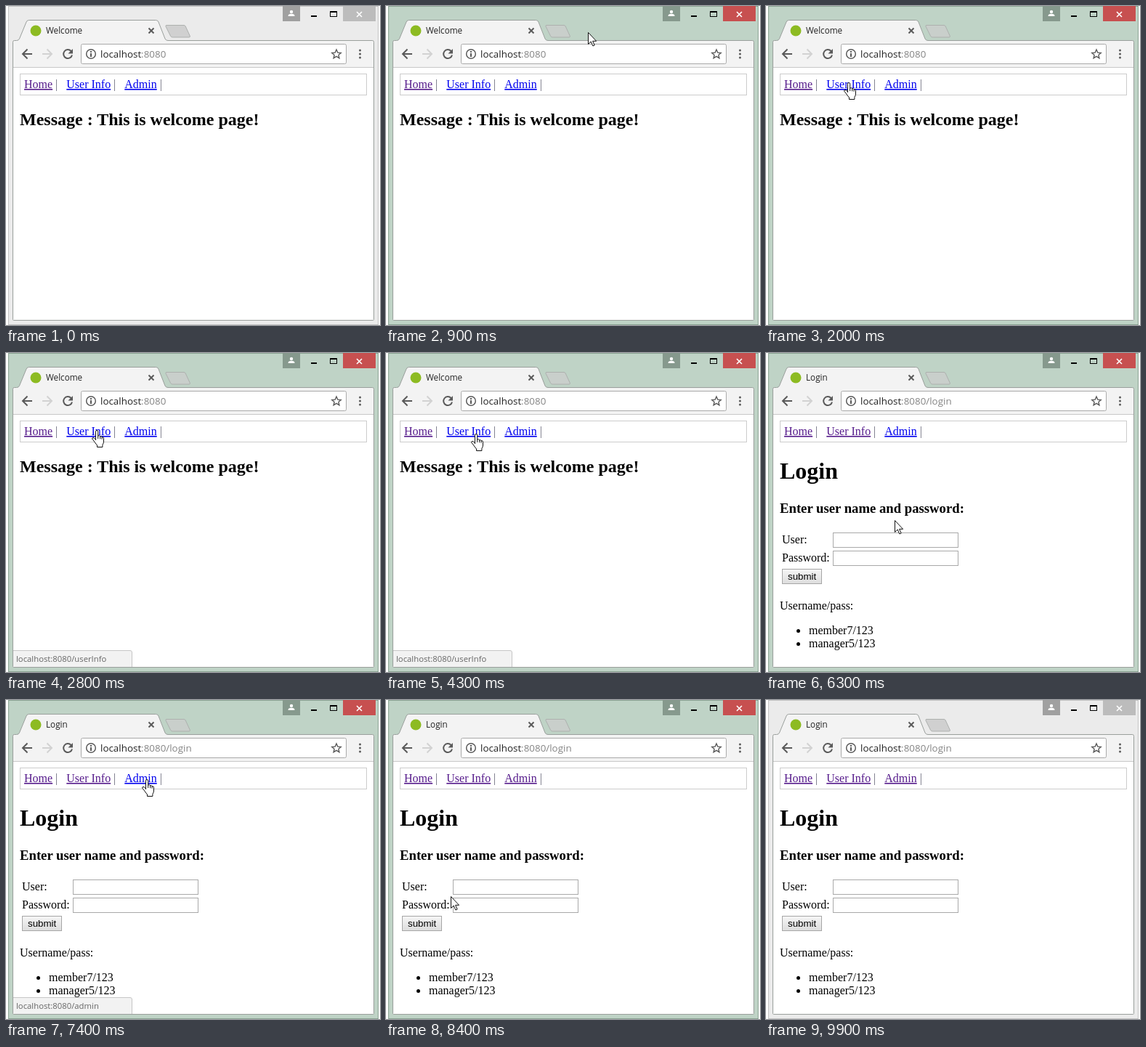
An HTML page that plays this animation: 515 by 439 pixels, repeating every 10 s.

```html
<!DOCTYPE html>
<html lang="en">
<head>
<meta charset="utf-8">
<title>Login demo</title>
<style>
html, body { margin: 0; width: 100%; height: 100%; overflow: hidden; background: #fff; }
svg { display: block; --frame: #ebebeb; --edge: #c3c3c3; --user: #a0a0a0; --close: #bcbcbc; --plus: #d0d0d0; }
svg.on { --frame: #bfd3c6; --edge: #8ba394; --user: #86998d; --close: #c75050; --plus: #c9cfcb; }
text { font: 16px "Liberation Serif", "Times New Roman", serif; white-space: pre; }
.ui { font-family: "Open Sans", "Noto Sans", sans-serif; }
.link { fill: #00e; text-decoration: underline; text-decoration-skip-ink: none; }
.seen { fill: #551a8b; }
.bar { fill: #667; }
.bold { font-weight: bold; }
.icon { fill: none; stroke: #5a5a5a; stroke-width: 2; }
.field { fill: #fff; stroke: #a9a9a9; }
.cursor { fill: #fff; stroke: #111; stroke-linejoin: round; }
</style>
</head>
<body>
<svg id="stage" width="515" height="439" viewBox="0 0 515 439">
  <defs>
    <linearGradient id="face" x2="0" y2="1"><stop stop-color="#f6f6f6"/><stop offset="1" stop-color="#ddd"/></linearGradient>
  </defs>

  <!-- window frame -->
  <rect x="3.5" y=".5" width="509" height="438" fill="var(--frame)" stroke="var(--edge)"/>
  <path d="M381 0h24v21h-24z" fill="var(--user)"/>
  <g fill="#fff"><circle cx="393" cy="8" r="2.2"/><path d="M388.5 14q0-3.2 4.5-3.2t4.5 3.2z"/></g>
  <path d="M420 13h8v2h-8z"/>
  <path d="M446 7h10v8h-10zm1 2v5h8v-5z" fill-rule="evenodd"/>
  <path d="M464 0h45v21h-45z" fill="var(--close)"/>
  <path d="M483 8l7 7m0-7l-7 7" stroke="#fff" stroke-width="1.6"/>

  <!-- tab strip and toolbar -->
  <path d="M221 26.5h24q1.500 0 2.200 1.500l6 13q.8 2-1 2h-23q-1.800 0-2.500-1.500l-6.500-13q-.9-2 .8-2z" fill="var(--plus)" stroke="#adb0ae"/>
  <path d="M9.500 431.500v-382q0-2 2-2h3q3 0 4-2.500l9.500-23q1-2.500 3.500-2.500h175q2.500 0 3.500 2.500l9 23q1 2.500 4 2.500h281.500q2 0 2 2v382q0 1-1 1h-495q-1 0-1-1z" fill="#f3f3f3" stroke="#9a9f9c"/>
  <path d="M10 85h496v347H10z" fill="#fff"/>
  <path d="M10 84.500h496" stroke="#c8c8c8"/>
  <circle cx="41" cy="34" r="7.500" fill="#8dbb22"/>
  <text class="ui" id="title" x="55" y="38" style="font-size:11.700px" fill="#222"></text>
  <path class="icon" d="M196.500 30.500l7 7m0-7l-7 7"/>
  <path class="icon" d="M36 66H23m6.500-6.500L23 66l6.500 6.500"/>
  <path class="icon" d="M50 66h13m-6.500-6.500L63 66l-6.500 6.500" style="stroke:#d2d2d2"/>
  <path class="icon" d="M89.600 62A6 6 0 1 0 91 67.500"/>
  <path d="M92 59v6.500h-6.500z" fill="#5a5a5a"/>
  <rect class="field" x="103.500" y="52.500" width="365" height="27" rx="2"/>
  <circle class="icon" cx="117" cy="66" r="6.300" style="stroke-width:1.500"/>
  <path d="M116 62h2v2h-2zm0 3h2v5h-2z" fill="#5a5a5a"/>
  <text class="ui" x="130" y="71" style="font-size:13.400px" fill="#222">localhost<tspan id="path" fill="#858585"></tspan></text>
  <path class="icon" d="M455 60l1.800 4.100 4.400.4-3.300 2.900 1 4.300-3.900-2.300-3.900 2.300 1-4.300-3.300-2.900 4.400-.4z" style="stroke-width:1.400"/>
  <path d="M487.500 61v11" fill="none" stroke="#5a5a5a" stroke-width="3" stroke-linecap="round" stroke-dasharray="0 5"/>

  <!-- page -->
  <rect x="19.500" y="93.500" width="477" height="29" fill="none" stroke="#ccc"/>
  <text class="link seen" x="25" y="113">Home</text><text class="bar" x="68" y="113">|</text>
  <text class="link" id="info" x="83.300" y="113">User Info</text><text class="bar" x="148" y="113">|</text>
  <text class="link" id="admin" x="163.300" y="113">Admin</text><text class="bar" x="211.800" y="113">|</text>

  <text class="bold" id="welcome" x="19" y="164" style="font-size:24px">Message : This is welcome page!</text>
  <g id="login">
    <text class="bold" x="19" y="173" style="font-size:32px">Login</text>
    <text class="bold" x="19" y="220" style="font-size:18.720px">Enter user name and password:</text>
    <text x="22" y="262">User:</text>
    <rect class="field" x="92.500" y="247.500" width="172" height="20"/>
    <text x="22" y="287">Password:</text>
    <rect class="field" x="92.500" y="272.500" width="172" height="20"/>
    <rect x="22.500" y="297.500" width="54" height="20" fill="url(#face)" stroke="#a6a6a6"/>
    <text x="30" y="312" style="font:13.333px 'Liberation Sans',Arial,sans-serif">submit</text>
    <text x="19" y="353">Username/pass:</text>
    <circle cx="44.500" cy="382.500" r="2.500"/><text x="59" y="387">member7/123</text>
    <circle cx="44.500" cy="400.500" r="2.500"/><text x="59" y="405">manager5/123</text>
  </g>

  <g id="status">
    <path d="M10 409.500h161q2.500 0 2.500 2.500v20H10z" fill="#f2f2f2"/>
    <path d="M10 409.500h161q2.500 0 2.500 2.500v20" fill="none" stroke="#c6c6c6"/>
    <text class="ui" id="address" x="14" y="425" style="font-size:11.300px" fill="#666"></text>
  </g>

  <g id="cursor" class="cursor">
    <path id="arrow" d="M.5.5v16l3.700-3.500 2.700 6 2.300-1-2.600-5.700h5z"/>
    <path id="beam" d="M-3-7.500h2.500l.5.500.5-.5H3M0-7V7M-3 7.500h2.500L0 7l.5.500H3" fill="none"/>
    <g id="hand" transform="translate(-5)">
      <path d="M5.500 14V2.200Q5.500.5 7.100.5t1.600 1.700V8q2.400-1 3 .8 2-.6 2.400.9 2.400-.3 2.400 1.600V16q0 2-1.600 4.500v3H7.500V21Q5 18 3 15L.8 12.400Q.2 10.600 2 10.500q2 .2 3.500 2.500"/>
      <path d="M8.700 8v4m3-3.200v3.500m2.400-2.600v3" fill="none"/>
    </g>
  </g>
</svg>
<script>
const $ = id => document.getElementById(id);
const show = (id, on) => $(id).style.display = on ? "" : "none";

// time, x, y of the pointer's hot spot
const route = [
  [200, 419, 87], [600, 263, 40], [700, 278, 36], [1000, 278, 36],
  [2100, 95, 112], [2800, 123, 106], [3500, 194, 111], [3600, 194, 111],
  [4300, 122, 111], [4900, 122, 111], [5700, 130, 235], [6300, 177, 230],
  [6900, 192, 108], [7700, 192, 110], [8400, 89, 270], [9300, 437, 114], [9400, 505, 57]
];
const links = [["", 25, 64], ["userInfo", 83, 144], ["admin", 163, 208]];
const fields = [...document.querySelectorAll(".field")].map(f => f.getBBox());

function pointerAt(t) {
  const i = route.findIndex(k => k[0] >= t);
  if (i < 0 || t < route[0][0]) return null;
  const [t1, x1, y1] = route[i], [t0, x0, y0] = route[Math.max(i - 1, 0)];
  const p = (t - t0) / (t1 - t0 || 1);
  return [Math.round(x0 + (x1 - x0) * p), Math.round(y0 + (y1 - y0) * p)];
}

function linkAt(t) {
  const [x, y] = pointerAt(t) || [0, 0];
  return y > 98 && y < 118 && links.find(([, a, b]) => x >= a && x <= b);
}

const inField = (x, y) =>
  fields.some(f => x >= f.x && x <= f.x + f.width && y >= f.y && y <= f.y + f.height);

function draw(t) {
  const login = t >= 4700;
  $("stage").classList.toggle("on", t >= 900 && t < 9900);
  $("title").textContent = login ? "Login" : "Welcome";
  $("path").textContent = login ? ":8080/login" : ":8080";
  show("welcome", !login);
  show("login", login);
  $("info").classList.toggle("seen", login);
  $("admin").classList.toggle("seen", t >= 7600);

  // the status bubble lags behind the pointer and lingers a little
  const hint = [200, 300, 400].map(lag => linkAt(t - lag)).find(Boolean);
  show("status", hint);
  $("address").textContent = hint ? "localhost:8080/" + hint[0] : "";

  const at = pointerAt(t);
  show("cursor", at);
  if (!at) return;
  const shape = linkAt(t) ? "hand" : inField(...at) ? "beam" : "arrow";
  for (const id of ["hand", "beam", "arrow"]) show(id, id === shape);
  $("cursor").setAttribute("transform", `translate(${at})`);
}

const start = performance.now();
function tick() {
  const t = (performance.now() - start) % 10000;
  draw(Math.floor(t / 100) * 100);
  requestAnimationFrame(tick);
}
tick();
</script>
</body>
</html>
```
